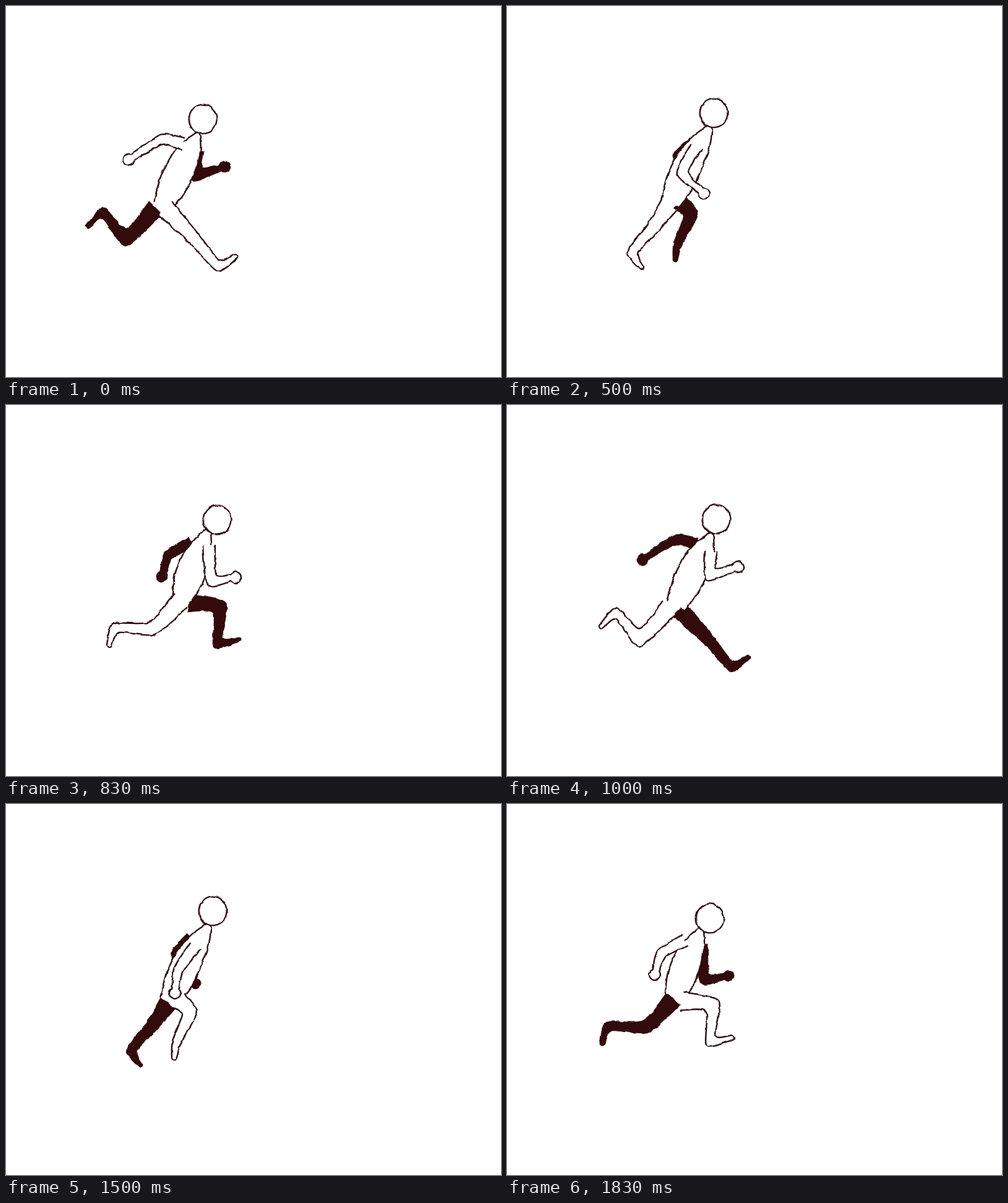
Write an HTML page that moves like this. It is 800x600 px and loops after 1.99 s.

```html
<!DOCTYPE html>
<html lang="en">
<head>
<meta charset="utf-8">
<title>Run cycle</title>
<style>
  html, body { margin: 0; width: 100%; height: 100%; overflow: hidden; background: #fff; }
  svg { display: block; width: 100vw; height: 100vh; }
  .pose { display: none; filter: url(#wobble); stroke: #2c0c0f; stroke-linejoin: round; stroke-linecap: round; }
  .ink { fill: #330b0c; stroke-width: .8; }
  .paper { fill: #fff; stroke-width: 2.2; }
  .sketch { fill: none; stroke-width: .7; opacity: .75; }
</style>
</head>
<body>
<svg id="stage" viewBox="0 0 800 600">
  <filter id="wobble" filterUnits="userSpaceOnUse" x="0" y="0" width="800" height="600" color-interpolation-filters="sRGB">
    <feTurbulence type="fractalNoise" baseFrequency=".09" numOctaves="2" seed="4"/>
    <feDisplacementMap in="SourceGraphic" scale="4" xChannelSelector="R" yChannelSelector="G"/>
  </filter>
</svg>
<script>
const stage = document.getElementById('stage');

// Joints only. Spine: hip, chest, neck. Arm: shoulder, elbow, fist. Leg: hip, knee, ankle, toe.
const contact = {
  head: [[318, 183]],
  spine: [[254, 322], [289, 249], [308, 212]],
  nearArm: [[286, 223], [252, 216], [199, 248]],
  nearLeg: [[258, 328], [305, 377], [343, 420], [370, 406]],
  farArm: [[310, 235], [310, 272], [353, 260]],
  farLeg: [[242, 326], [194, 374], [157, 335], [133, 356]]
};
const down = {
  head: [[322, 192]],
  spine: [[247, 337], [283, 254], [309, 217]],
  nearArm: [[288, 226], [235, 237], [206, 275]],
  nearLeg: [[256, 338], [287, 377], [260, 424], [294, 427]],
  farArm: [[308, 248], [309, 282], [356, 277]],
  farLeg: [[238, 338], [222, 385], [188, 361], [156, 366]]
};
const push = {
  head: [[334, 173]],
  spine: [[264, 319], [298, 246], [325, 201]],
  nearArm: [[306, 228], [284, 270], [318, 303]],
  nearLeg: [[262, 322], [234, 361], [203, 398], [217, 422]],
  farArm: [[302, 220], [277, 243], [295, 283]],
  farLeg: [[278, 318], [297, 338], [276, 385], [272, 410]]
};
const flight = {
  head: [[341, 186]],
  spine: [[284, 313], [306, 251], [325, 208]],
  nearArm: [[328, 228], [333, 283], [371, 279]],
  nearLeg: [[282, 316], [237, 361], [178, 361], [167, 388]],
  farArm: [[300, 222], [263, 243], [252, 277]],
  farLeg: [[296, 320], [345, 328], [343, 384], [376, 379]]
};

const mid = (a, b, t = .5) => a.map((v, i) => v + (b[i] - v) * t);
const eachPart = (p, fn) => Object.fromEntries(Object.keys(p).map(k => [k, fn(k)]));
const blend = (p, q) => eachPart(p, k => p[k].map((pt, i) => mid(pt, q[k][i])));
const move = (p, dx, dy) => eachPart(p, k => p[k].map(([x, y]) => [x + dx, y + dy]));
const swap = p => ({
  ...p, nearArm: p.farArm, nearLeg: p.farLeg, farArm: p.nearArm, farLeg: p.nearLeg
});

const passing = {
  ...blend(down, push),
  head: [[328, 178]],
  nearLeg: [[255, 330], [262, 376], [234, 424], [264, 428]],
  farLeg: [[258, 330], [278, 375], [230, 380], [206, 394]]
};
const lift = {
  ...blend(push, flight),
  head: [[338, 169]],
  nearLeg: [[272, 319], [228, 362], [170, 402], [168, 421]]
};
const down2 = { ...swap(down), nearArm: [[306, 246], [308, 282], [355, 267]] };
const push2 = {
  ...swap(push),
  nearArm: [[306, 230], [279, 268], [273, 306]],
  farArm: [[300, 216], [276, 243], [306, 290]]
};

const steps = [
  [0, contact], [170, down], [330, passing], [500, push], [670, lift], [830, flight],
  [1000, move(swap(contact), 20, 2)], [1170, down2], [1330, swap(passing)],
  [1500, push2], [1670, swap(lift)], [1830, move(swap(flight), -13, -1)]
];
const loop = 1990;

const torsoWidths = [32, 47, 44, 32, 14];
const armWidths = [20, 15, 11];
const legWidths = [30, 20, 14, 8];

function add(parent, tag, attrs) {
  const el = document.createElementNS('http://www.w3.org/2000/svg', tag);
  for (const k in attrs) el.setAttribute(k, attrs[k]);
  return parent.appendChild(el);
}

const unit = (a, b) => {
  const x = b[0] - a[0], y = b[1] - a[1], n = Math.hypot(x, y) || 1;
  return [x / n, y / n];
};

// Gently curved segments through the points.
function curve(pts) {
  const at = i => pts[Math.max(0, Math.min(pts.length - 1, i))];
  const lean = (a, b, c, s) => a.map((v, k) => v + s * (c[k] - b[k]) * .12);
  let d = '';
  for (let i = 0; i < pts.length - 1; i++) {
    const a = at(i), b = at(i + 1);
    d += 'C' + [lean(a, at(i - 1), b, 1), lean(b, a, at(i + 2), -1), b].join(' ');
  }
  return d;
}

// Tapered outline around a chain of joints: open at the root, round at the tip.
function outline(pts, widths, tip) {
  const last = pts.length - 1, left = [], right = [];
  pts.forEach((p, i) => {
    const a = unit(pts[Math.max(0, i - 1)], pts[Math.max(1, i)]);
    const b = unit(pts[Math.min(last - 1, i)], pts[Math.min(last, i + 1)]);
    const dir = unit([0, 0], [a[0] + b[0], a[1] + b[1]]);
    const cos = dir[0] * a[0] + dir[1] * a[1];
    const r = widths[i] / 2 * Math.min(1.7, 1 / Math.max(.1, cos));
    left.push([p[0] - dir[1] * r, p[1] + dir[0] * r]);
    right.unshift([p[0] + dir[1] * r, p[1] - dir[0] * r]);
  });
  const large = tip * 2 > widths[last] ? 1 : 0;
  return `M${left[0]}${curve(left)}A${tip} ${tip} 0 ${large} 0 ${right[0]}${curve(right)}`;
}

function torso([hip, chest, neck]) {
  return outline([hip, mid(hip, chest), chest, mid(chest, neck, .6), neck], torsoWidths, 7);
}

function arm([shoulder, elbow, fist]) {
  const d = unit(elbow, fist);
  return outline([shoulder, elbow, [fist[0] - d[0] * 7, fist[1] - d[1] * 7]], armWidths, 9);
}

const leg = pts => outline(pts, legWidths, 4);

function draw(p) {
  const g = add(stage, 'g', { class: 'pose' });
  const ink = d => add(g, 'path', { d, class: 'ink' });
  const paper = d => {
    add(g, 'path', { d, class: 'paper' });
    add(g, 'path', { d, class: 'sketch', transform: 'translate(-.9 -.8)' });
  };
  ink(arm(p.farArm));
  ink(leg(p.farLeg));
  paper(torso(p.spine));
  paper(leg(p.nearLeg));
  paper(arm(p.nearArm));
  const [cx, cy] = p.head[0];
  add(g, 'ellipse', { cx, cy, rx: 22.5, ry: 23.5, class: 'paper' });
  add(g, 'ellipse', { cx: cx + 1, cy: cy - 1, rx: 22, ry: 24, class: 'sketch' });
  return g;
}

const poses = steps.map(s => draw(s[1]));
let shown = -1;

function show(t) {
  let i = steps.length - 1;
  while (i > 0 && steps[i][0] > t) i--;
  if (i === shown) return;
  poses.forEach((g, k) => g.style.display = k === i ? 'inline' : 'none');
  shown = i;
}

const start = performance.now();
function tick() {
  show((performance.now() - start) % loop);
  requestAnimationFrame(tick);
}
tick();
</script>
</body>
</html>
```
